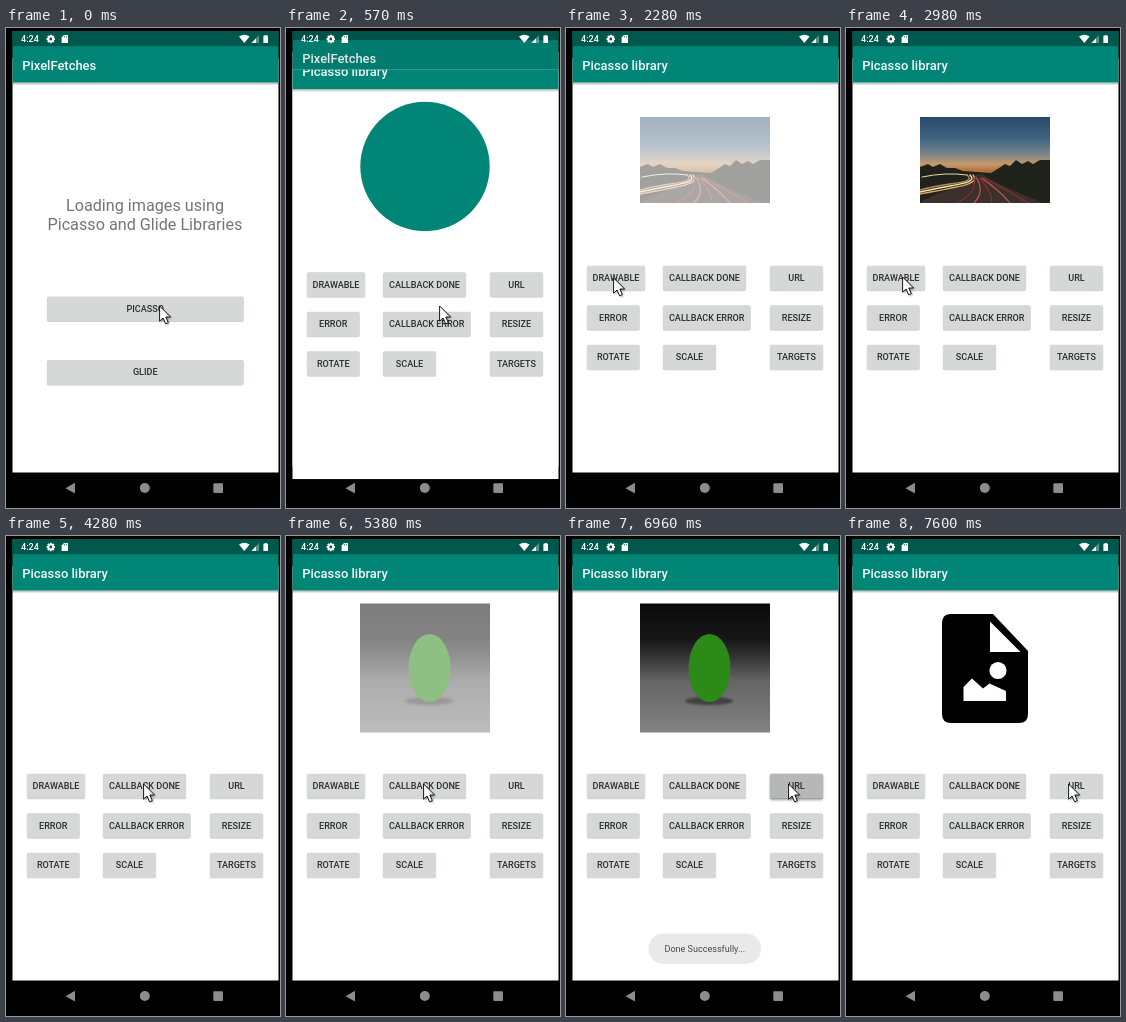
An HTML page that plays this animation: 274x480 px, repeating every 8 s.

```html
<!DOCTYPE html>
<html lang="en">
<head>
<meta charset="utf-8">
<title>Image libraries demo</title>
<style>
html, body { margin: 0; width: 100%; height: 100%; overflow: hidden; background: #000; }
svg { display: block; width: 100vw; height: 100vh; }
text { font-family: Roboto, "Noto Sans", sans-serif; }
.title { font-size: 12.94px; font-weight: 500; fill: #f4f9f8; }
.label { font-size: 9.06px; font-weight: 500; fill: #2c2c2c; text-anchor: middle; }
.head { font-size: 16.2px; fill: #757575; text-anchor: middle; }
.clock { font-size: 9.06px; font-weight: 500; fill: #fff; }
.toast { font-size: 9.06px; fill: #4a4a4a; text-anchor: middle; }
</style>
</head>
<body>
<svg id="stage" viewBox="0 0 274 480"></svg>
<script>
const LOOP = 8000;
const stage = document.getElementById('stage');

// ---- drawing helpers ----
const rect = (x, y, w, h, fill, more = '') =>
  `<rect x="${x}" y="${y}" width="${w}" height="${h}" fill="${fill}" ${more}/>`;
const path = (d, fill, more = '') => `<path d="${d}" fill="${fill}" ${more}/>`;
const line = (d, color, width) =>
  path(d, 'none', `stroke="${color}" stroke-width="${width}" stroke-linecap="round"`);
const words = (cls, x, y, s) => `<text class="${cls}" x="${x}" y="${y}">${s}</text>`;
const gradient = (id, stops) =>
  `<linearGradient id="${id}" x2="0" y2="1">` +
  stops.map(([at, c, o = 1]) => `<stop offset="${at}" stop-color="${c}" stop-opacity="${o}"/>`).join('') +
  '</linearGradient>';
const clip = (id, shape) => `<clipPath id="${id}">${shape}</clipPath>`;

// Press: pointer position, start, full radius time, fade start, fade end
const presses = [];
function button(s, x, y, w, press) {
  const h = 24.5, mid = x + w / 2;
  let glow = '', lift = '';
  if (press) {
    const id = 'press' + presses.length;
    presses.push({ id, ...press });
    lift = rect(x, y + 1, w, h + 1, '#000', `rx="2" id="${id}lift" filter="url(#soft)" opacity="0"`);
    glow = clip(id + 'clip', rect(x, y, w, h, '#000', 'rx="1.5"')) +
      `<g clip-path="url(#${id}clip)"><circle id="${id}" cx="${press.x}" cy="${press.y}" r="0"/></g>`;
  }
  return lift + rect(x - .2, y + .5, w + .4, h + .5, '#000', 'rx="1.7" opacity=".18"') +
    rect(x, y, w, h, '#d6d7d7', 'rx="1.5"') + glow + words('label', mid, y + 15.3, s);
}

const LEFT = 6.5, TOP = 3, WIDE = 266, BAR_END = 54.5, NAV = 444.5;
const appWindow = (title, body) =>
  rect(LEFT, 30, WIDE, NAV - 30, '#fff') + body +
  rect(LEFT, BAR_END, WIDE, 3, 'url(#barShade)') +
  rect(LEFT, TOP, WIDE, BAR_END - TOP, '#008577') +
  rect(LEFT, TOP, WIDE, 15.2, '#00574b') +
  words('title', 16.2, 41.5, title);

const home = appWindow('PixelFetches',
  words('head', 139, 183.4, 'Loading images using') +
  words('head', 139, 202.4, 'Picasso and Glide Libraries') +
  button('PICASSO', 41, 268.5, 196.5, { x: 154, y: 281, from: 150, full: 195, fade: 800, end: 900 }) +
  button('GLIDE', 41, 332, 196.5));

const logo = '<circle cx="139" cy="132" r="64.7" fill="#008577"/>';

const road = rect(74, 89, 130, 86, 'url(#sky)') +
  path('M74 139l8-3 5 3 7-3 7 4 8 0 8 3 14 1 14 1 8-5 6-4 5 2 6-6 6 4 6-3 5 3 7-4L204 132V175H74Z', '#20221c') +
  path('M74 175C94 160 136 158 128 147L136 146C150 156 176 166 197 175Z', '#3a302c') +
  [[80, 158], [88, 160], [97, 162]].map(([x, y], i) =>
    line(`M74 ${y + 4}C${x + 20} ${y - 4} ${132 + i} 156 ${121 + i * 3} 147`, ['#b98a4e', '#f4e6bf', '#d8a765'][i], 1.4)).join('') +
  [0, 1, 2, 3, 4].map(i =>
    line(`M${110 + i * 18} 175Q${132 + i * 7} ${165 - i} ${128 + i * 2.5} 150`, i % 2 ? '#d0584a' : '#8e2f29', 1.1)).join('') +
  line('M76 149Q100 144 121 147', '#e9d8a8', 1);

const figure = rect(74, 67.5, 130, 129, 'url(#studio)') +
  '<ellipse cx="143" cy="165" rx="24" ry="4" fill="#222" opacity=".6" filter="url(#soft)"/>' +
  '<ellipse cx="143.5" cy="132" rx="21" ry="34" fill="#2b8a18"/>';

const file = path('M104 78H147L182 115V178Q182 187 173 187H105Q96 187 96 178V88Q96 78 104 78Z', '#000') +
  path('M144 85.5V116H174.5Z', '#fff') +
  '<circle cx="152" cy="134.5" r="8.6" fill="#fff"/>' +
  path('M117.5 165V151L126 142.5 137 152.5 143.5 147.5 160 155V165Z', '#fff');

const pics = { logo, road, figure, file };
const detail = appWindow('Picasso library',
  Object.entries(pics).map(([id, art]) => `<g id="${id}" clip-path="url(#${id === 'road' ? 'roadBox' : 'any'})">${art}</g>`).join('') +
  button('DRAWABLE', 21, 237.7, 58, { x: 48, y: 250, from: 1360, full: 1410, fade: 1690, end: 1760 }) +
  button('CALLBACK DONE', 97, 237.7, 83, { x: 138, y: 250, from: 3850, full: 3950, fade: 4150, end: 4280 }) +
  button('URL', 204, 237.7, 53, { x: 223, y: 250, from: 6830, full: 6930, fade: 7150, end: 7270 }) +
  button('ERROR', 21, 277.2, 52.5) +
  button('CALLBACK ERROR', 97, 277.2, 87.5) +
  button('RESIZE', 204, 277.2, 53) +
  button('ROTATE', 21, 316.7, 52.5) +
  button('SCALE', 97, 316.7, 53) +
  button('TARGETS', 204, 316.7, 53));

const toast = rect(82.5, 397.5, 112.5, 30.5, '#e9e9e9', 'rx="15"') +
  words('toast', 138.8, 416, 'Done Successfully...');

const gearTeeth = [0, 45, 90, 135].map(a =>
  rect(43.8, 6.8, 2, 8.4, '#fff', `transform="rotate(${a} 44.8 11)"`)).join('');
const system = words('clock', 15, 14.2, '4:24') + gearTeeth +
  '<circle cx="44.8" cy="11" r="2.4" fill="none" stroke="#fff" stroke-width="1.7"/>' +
  '<circle cx="44.8" cy="11" r="1.4" fill="#00574b"/>' +
  path('M58 7H62V15H55.6V9.5Z', '#fff') +
  path('M58.4 8v1.6M60.4 8v1.6', 'none', 'stroke="#00574b" stroke-width=".7"') +
  path('M233 8.6Q238.3 4.8 243.6 8.6L238.3 15Z', '#fff') +
  path('M245.5 15L253 7V15Z', '#fff', 'opacity=".35"') +
  path('M245.5 15L250 10.2V15Z', '#fff') +
  path('M257.4 7.8h1.3V7h2v.8h1.3V15h-4.6Z', '#fff') +
  path('M69 454.7V465.6L59.5 460.2Z', '#8c8c8c') +
  '<circle cx="138.8" cy="460" r="5" fill="#8c8c8c"/>' +
  rect(207.3, 455.2, 9.7, 9.7, '#8c8c8c', 'rx=".8"');

const arrow = 'M0 0V15.2L3.5 12L6 17.8L8.7 16.6L6.2 11H11Z';
const cursor = path(arrow, '#000', 'opacity=".4" transform="translate(1.3 1.3)" filter="url(#soft)"') +
  path(arrow, '#fff', 'stroke="#000" stroke-width=".9" stroke-linejoin="round"');

stage.innerHTML = '<defs>' +
  gradient('barShade', [[0, '#000', .32], [1, '#000', 0]]) +
  gradient('sky', [[0, '#28486a'], [.25, '#3f6480'], [.42, '#75838a'], [.55, '#c59a6c'], [.63, '#b0703c']]) +
  gradient('studio', [[0, '#0a0a0b'], [.28, '#171718'], [.42, '#353535'], [.6, '#656566'], [1, '#828282']]) +
  '<filter id="soft" x="-30%" y="-30%" width="160%" height="160%"><feGaussianBlur stdDeviation="1"/></filter>' +
  clip('roadBox', rect(74, 89, 130, 86, '#000')) +
  clip('any', rect(74, 67, 130, 130, '#000')) +
  clip('screen', rect(0, TOP, 274, 480, '#000')) +
  clip('reveal', '<rect id="revealBox" x="0" width="274" height="480"/>') +
  '</defs>' + rect(0, 0, 274, 480, '#000') +
  `<g clip-path="url(#screen)"><g id="home">${home}</g>` +
  `<g id="detail" clip-path="url(#reveal)">${detail}</g></g>` +
  `<g id="toast">${toast}</g>${system}<g id="cursor">${cursor}</g>`;

// ---- timing ----
const $ = id => document.getElementById(id);
const clamp = v => Math.max(0, Math.min(1, v));
const set = (id, name, v) => $(id).setAttribute(name, v);

// Linear track of [time, value, value...] rows
function track(rows, t) {
  const i = rows.findIndex(r => r[0] > t);
  if (i < 0) return rows[rows.length - 1].slice(1);
  if (i === 0) return rows[0].slice(1);
  const a = rows[i - 1], b = rows[i], k = (t - a[0]) / (b[0] - a[0]);
  return a.slice(1).map((v, n) => v + (b[n + 1] - v) * k);
}

// Cubic curve through four points, solved for y at x
function curve(xs, ys, x) {
  const at = (p, s) => {
    const r = 1 - s;
    return p[0] * r ** 3 + 3 * p[1] * s * r * r + 3 * p[2] * s * s * r + p[3] * s ** 3;
  };
  let lo = 0, hi = 1;
  for (let i = 0; i < 24; i++) {
    const m = (lo + hi) / 2;
    if (at(xs, m) < x) lo = m; else hi = m;
  }
  return at(ys, lo);
}
const slide = x => curve([0, .4, .2, 1], [0, 0, 1, 1], x);
const unveil = x => x < 1 / 6
  ? curve([0, .05, .1333, .1667], [0, 0, .06, .4], x)
  : curve([.1667, .2083, .25, 1], [.4, .82, 1, 1], x);

const pointer = [
  [0, 154, 278], [930, 154, 278], [1040, 128, 272], [1180, 72, 256], [1300, 48, 250],
  [2690, 48, 250], [2960, 57, 249], [3080, 57, 249], [3300, 100, 243], [3500, 135, 246.5], [3560, 138, 248],
  [5800, 138, 248], [6050, 166, 249], [6140, 166, 249], [6250, 186, 249], [6280, 186, 249], [6580, 223, 248]
];
const fades = {
  logo: [[0, 1], [1699, 1], [1700, 0]],
  road: [[2119, 0], [2120, .25], [2270, .35], [2370, 1], [4130, 1], [4131, 0]],
  figure: [[5270, 0], [5480, 1], [6989, 1], [6990, 0]],
  file: [[6989, 0], [6990, 1]],
  toast: [[5480, 0], [5780, 1], [7350, 1], [7600, 0]]
};

function draw(t) {
  const x = clamp((t - 405) / 385), p = slide(x);
  set('home', 'transform', `translate(0 ${-9 * p})`);
  set('home', 'opacity', 1 - .1 * p);
  set('home', 'visibility', x < 1 ? 'visible' : 'hidden');
  set('detail', 'visibility', x > 0 ? 'visible' : 'hidden');
  set('detail', 'transform', `translate(0 ${20 * (1 - p)})`);
  set('revealBox', 'y', x < 1 ? TOP + 440 * (1 - unveil(x)) : 0);

  for (const id in fades) set(id, 'opacity', track(fades[id], t)[0]);

  for (const { id, from, full, fade, end } of presses) {
    const grow = clamp((t - from) / (full - from));
    const hold = t < from ? 0 : 1 - clamp((t - fade) / (end - fade));
    set(id, 'r', 15 + 100 * grow);
    set(id, 'opacity', .15 * hold);
    set(id + 'lift', 'opacity', .3 * hold * grow);
  }

  const [cx, cy] = track(pointer, t);
  set('cursor', 'transform', `translate(${cx - .4} ${cy})`);
}

const start = performance.now();
function tick() {
  draw((performance.now() - start) % LOOP);
  requestAnimationFrame(tick);
}
tick();
</script>
</body>
</html>
```
